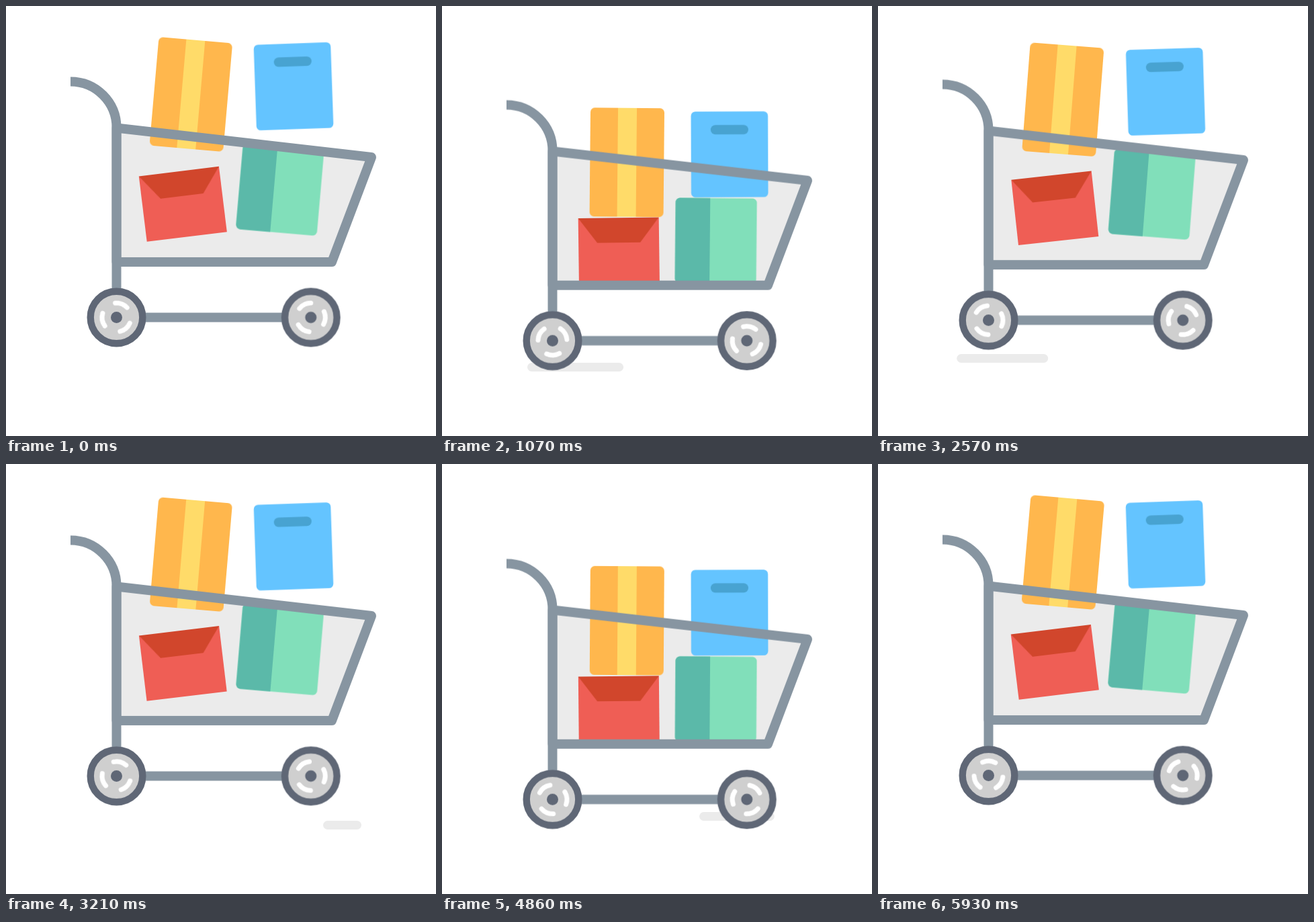
Animation, 640 px wide and 640 px high, one loop 6 s. Source, as an HTML page:

```html
<!DOCTYPE html>
<html lang="en">
<head>
<meta charset="utf-8">
<title>Shopping cart</title>
<style>
  @property --lead { syntax: "<number>"; inherits: false; initial-value: 0; }
  @property --trail { syntax: "<number>"; inherits: false; initial-value: 0; }

  html, body { margin: 0; width: 100%; height: 100%; overflow: hidden; background: #fff; }
  svg { display: block; width: 100%; height: 100%; }

  .cart { animation: bob 1500ms cubic-bezier(.6, 0, .4, 1) -10ms infinite alternate; }
  .drop { animation: drop 3000ms linear infinite; }
  .tilt { animation: tilt 1500ms cubic-bezier(.6, 0, .4, 1) -10ms infinite alternate; }
  .spin { animation: spin calc(6000ms / 13) linear infinite; }

  .frame { fill: none; stroke: #8795a1; stroke-width: 14; stroke-linejoin: round; }

  /* Ground streak: both ends are trimmed along the line, in thousandths. */
  .streak {
    stroke: #ebebeb; stroke-width: 13; stroke-linecap: round;
    stroke-dasharray: calc((var(--lead) - var(--trail)) * 1px) 3000px;
    stroke-dashoffset: calc(var(--trail) * -1px);
    animation: lead 3000ms infinite, trail 3000ms infinite, show 3000ms step-end infinite;
  }
  .late { animation-delay: -1500ms; }

  @keyframes bob { to { transform: translateY(38.8px); } }
  @keyframes tilt { from { transform: rotate(var(--a)); } to { transform: rotate(0deg); } }
  @keyframes spin { to { transform: rotate(120deg); } }
  @keyframes drop {
    0% { transform: translateY(0); animation-timing-function: cubic-bezier(.6, 0, .4, 1); }
    41.5% { transform: translateY(var(--d)); }
    55.8% { transform: translateY(var(--d)); animation-timing-function: cubic-bezier(.6, 0, .4, 1); }
    93.7%, 100% { transform: translateY(0); }
  }
  @keyframes lead {
    0% { --lead: 0; animation-timing-function: cubic-bezier(.27, .03, .5, 1); }
    46.667%, 100% { --lead: 1000; }
  }
  @keyframes trail {
    0% { --trail: 0; }
    9.333% { --trail: 0; animation-timing-function: cubic-bezier(.45, 0, .85, 1); }
    47.5%, 100% { --trail: 1000; }
  }
  @keyframes show {
    0% { opacity: 0; }
    .5% { opacity: 1; }
    47.5%, 100% { opacity: 0; }
  }
</style>
</head>
<body>
<svg viewBox="0 0 640 640">
  <defs>
    <g id="tyre">
      <circle r="38.8" fill="#cfcfcf" stroke="#5f6776" stroke-width="10.4"/>
      <circle r="8.5" fill="#5f6776"/>
    </g>
    <circle id="spokes" r="21.5" fill="none" stroke="#fff" stroke-width="7"
      stroke-linecap="round" stroke-dasharray="19.5 25.53"/>
  </defs>

  <path class="streak" pathLength="1000" d="M522.5 537.5H101.5"/>
  <path class="streak late" pathLength="1000" d="M491.5 524.5H93.5"/>

  <g class="cart">
    <path fill="#ebebeb" d="M164.5 181.5L544 225L485 381H164.5Z"/>

    <!-- red envelope -->
    <g transform="translate(263.3 294.8)"><g class="drop" style="--d:35.5px"><g class="tilt" style="--a:-7deg">
      <rect x="-60" y="-49" width="120" height="98" fill="#ef5e55"/>
      <path d="M-60-49L-32-12H32L60-49Z" fill="#d1462c"/>
    </g></g></g>

    <!-- green box -->
    <g transform="translate(407.7 273.7)"><g class="drop" style="--d:42px"><g class="tilt" style="--a:5deg">
      <rect x="-60.5" y="-63.5" width="121" height="127" rx="6.5" fill="#81dfba"/>
      <path d="M-9-63.5V63.5H-54A6.5 6.5 0 0 1-60.5 57V-57A6.5 6.5 0 0 1-54-63.5Z" fill="#5bb9a9"/>
    </g></g></g>

    <!-- yellow parcel -->
    <g transform="translate(275.3 131.5)"><g class="drop" style="--d:68px"><g class="tilt" style="--a:5deg">
      <rect x="-55" y="-81" width="110" height="162" rx="6.5" fill="#ffb74d"/>
      <rect x="-14" y="-81" width="28" height="162" fill="#ffdb69"/>
    </g></g></g>

    <!-- blue bag -->
    <g transform="translate(428 119.6)"><g class="drop" style="--d:68px"><g class="tilt" style="--a:-2deg">
      <rect x="-57.3" y="-63.8" width="114.6" height="127.6" rx="6.5" fill="#64c4ff"/>
      <rect x="-28" y="-43.7" width="56" height="14" rx="7" fill="#48a3d1"/>
    </g></g></g>

    <path class="frame" d="M164.5 181.5L544 225L485 381H164.5Z"/>
    <path class="frame" d="M96 112.5A68.5 68.5 0 0 1 164.5 181V463.5H453.5"/>

    <g transform="translate(164.5 463.5)">
      <use href="#tyre"/>
      <g transform="rotate(23)"><use class="spin" href="#spokes"/></g>
    </g>
    <g transform="translate(453.7 463.5)">
      <use href="#tyre"/>
      <g transform="rotate(-24)"><use class="spin" href="#spokes"/></g>
    </g>
  </g>
</svg>
</body>
</html>
```
